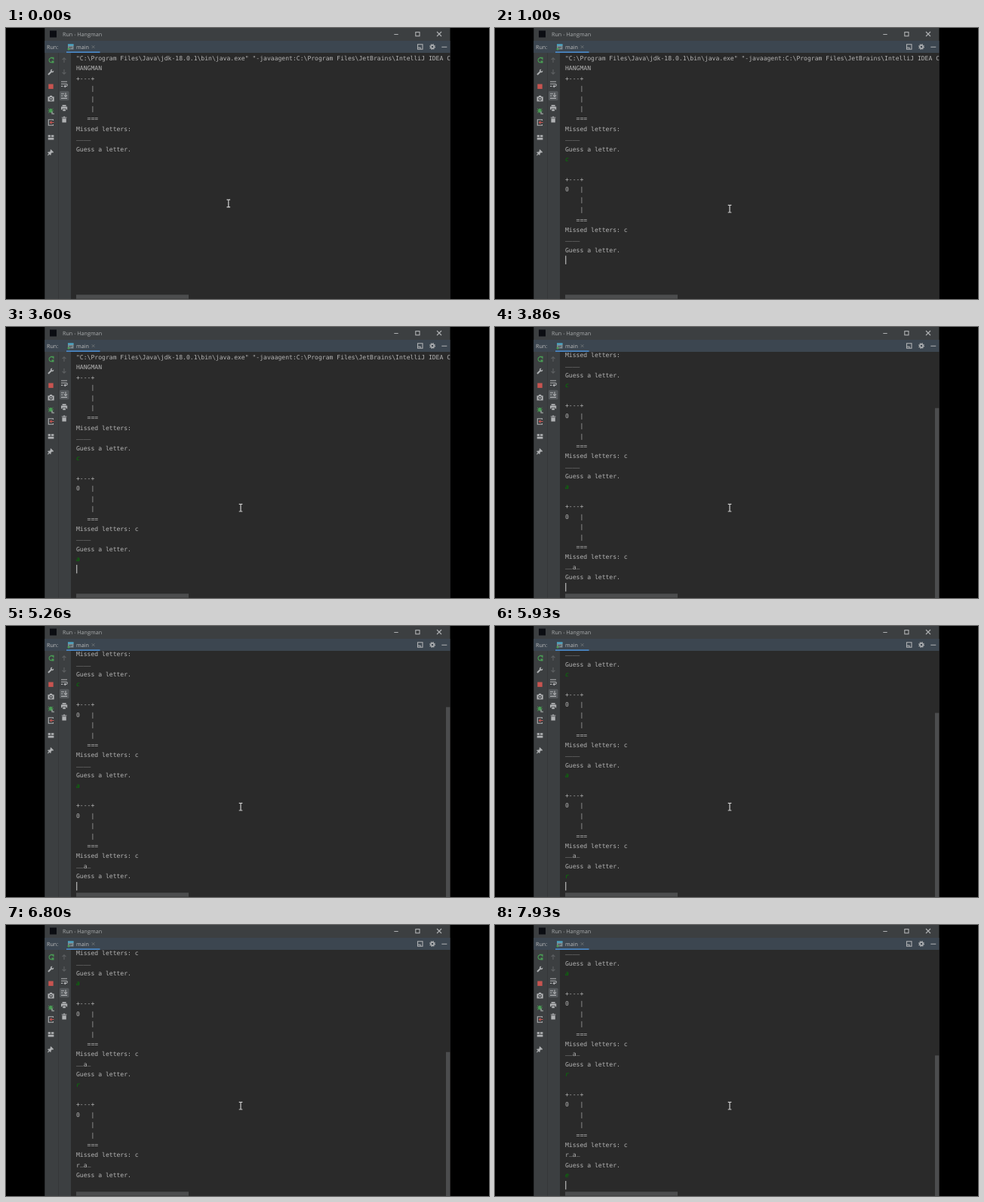
An HTML page for the animation above (8000 ms loop, 640 by 360 pixels).

```html
<!DOCTYPE html>
<html lang="en">
<head>
<meta charset="utf-8">
<title>Hangman console</title>
<style>
  html, body { margin: 0; width: 100%; height: 100%; overflow: hidden; background: #000; }
  svg { display: block; width: 100%; height: 100%; text-rendering: geometricPrecision; }
  .ui { font: 7.2px "Open Sans", sans-serif; fill: #bbb; }
  .console text { font: 8.08px "DejaVu Sans Mono", monospace; fill: #b5b5b5; white-space: pre; }
  .console .input { fill: #007f00; font-style: italic; }
  .blank { baseline-shift: 1.8px; }
  .icon { fill: none; stroke: #afb1b3; stroke-width: 1.1; }
  .dim { stroke: #5d6062; }
  .green { stroke: #499c54; }
  .solid { fill: #afb1b3; stroke: none; }
</style>
</head>
<body>
<svg viewBox="0 0 640 360">
  <defs>
    <clipPath id="pane"><rect x="86" y="33" width="502.5" height="327"/></clipPath>
  </defs>
  <rect width="640" height="360"/>
  <rect x="51.3" width="537.2" height="360" fill="#3c3f41"/>
  <rect x="86" y="33" width="502.5" height="327" fill="#2a2a2a"/>

  <!-- title bar -->
  <rect x="58" y="3.5" width="9" height="9" fill="#0b0d12"/>
  <text class="ui" x="75" y="10.7" style="fill:#a8abad">Run - Hangman</text>
  <g class="icon">
    <path d="M514.3 8.5h5.4M571 5l6 6m0-6l-6 6"/>
    <rect x="542.8" y="5.5" width="5.2" height="5.2"/>
  </g>

  <!-- tab bar -->
  <rect x="51.3" y="17" width="537.2" height="16" fill="#3c4650"/>
  <rect x="80" y="31.3" width="44.5" height="1.7" fill="#4a88c7"/>
  <text class="ui" x="54" y="27.8">Run:</text>
  <text class="ui" x="93" y="27.8">main</text>
  <rect x="82" y="21.5" width="7.5" height="7" fill="#7f8b91"/>
  <rect x="82" y="21.5" width="7.5" height="2" fill="#40a6c9"/>
  <path d="M83.5 25.5h4.5M83.5 27h3" stroke="#3c3f41" stroke-width=".7"/>
  <circle cx="83" cy="28" r="1.5" fill="#499c54"/>
  <path class="icon" style="stroke:#787b7d;stroke-width:.8" d="M113.8 23.3l3.6 3.6m0-3.6l-3.6 3.6"/>
  <g class="icon">
    <rect x="545.5" y="21.8" width="6.5" height="6.4"/>
    <path d="M546 26h3v2M577.3 25.2h7"/>
    <circle cx="565" cy="25" r="2.1" stroke-width="1.6"/>
    <circle cx="565" cy="25" r="3.4" stroke-dasharray="1.35 1.32"/>
  </g>

  <!-- run toolbar -->
  <path d="M69.5 33v327" stroke="#353739"/>
  <g class="icon">
    <path class="green" d="M62.5 41a3 3 0 1 0 0 3.5M59 39.3h4v3"/>
    <rect x="60.5" y="43.5" width="3" height="3" fill="#499c54" stroke="none"/>
    <path d="M56 62l4-4" stroke-width="2"/>
    <path class="solid" d="M61.5 54.8a2.2 2.2 0 1 0 1.7 1.7l-1.7 1.2l-1.1-1.1z"/>
    <rect x="56.3" y="74.5" width="6.4" height="6.4" fill="#c75450" stroke="none"/>
    <path class="solid" d="M55.5 91.2h2l1-1.4h2.2l1 1.4h2v6.3h-8.2z"/>
    <circle cx="59.6" cy="94.2" r="1.7" fill="#afb1b3" stroke="#3c3f41"/>
    <ellipse cx="59.3" cy="109.8" rx="2" ry="2.8" fill="#499c54" stroke="none"/>
    <path class="green" d="M56 107l6.5 6m0-6l-6.5 6M55.5 110h7.5" stroke-width=".8"/>
    <path d="M61 111v3h3"/>
    <path d="M62.5 123v-1.2h-6.2v7.4h6.2V128"/>
    <path d="M58.5 125.5h5M60.5 123.7l-2 1.8l2 1.8" stroke="#c75450"/>
    <path class="solid" d="M55.7 142.2h3.4v2.6h-3.4zM60 142.2h3.4v2.6H60zM55.7 145.7h7.7v2.8h-7.7z"/>
    <path class="solid" d="M59.5 161.3l3.7 3.7l-1 .7l-1.3-.3l-1.3 1.6l.1 1.4l-.8.7l-3.8-3.8l.8-.7l1.4.1l1.6-1.3l-.3-1.3z"/>
    <path d="M58 166.5l-2.6 2.6"/>
  </g>

  <!-- console toolbar -->
  <rect x="71" y="83.8" width="12.5" height="12.5" rx="1.5" fill="#55595c"/>
  <g class="icon">
    <path class="dim" d="M77 46v-6M74.6 42.2l2.4-2.4l2.4 2.4M77 55v6M74.6 58.8l2.4 2.4l2.4-2.4"/>
    <path d="M73 71.3h8M73 74.2h6.7a1.6 1.6 0 0 1 0 3.2h-2.2M78.8 75.8l-1.6 1.6l1.6 1.5M73 77.4h2.4"/>
    <path d="M73 87.3h4M73 90h2.5M79 86v5M77 89.3l2 2l2-2M73 93.4h8"/>
    <path class="solid" d="M74.6 102.2h5v1.8h-5zM73 104.6h8.2v4h-1.6v-1.6h-5v1.6H73zM75.3 107.7h3.6v2.6h-3.6z"/>
    <path class="solid" d="M73.8 118.4h2l.6-.8h1.4l.6.8h2v1.2h-6.6zM74.4 120.3h5.4v5.2h-5.4z"/>
  </g>

  <g class="console" clip-path="url(#pane)">
    <g id="page"><rect id="caret" width="1.1" height="11.4" fill="#c4c4c4"/></g>
  </g>
  <rect id="thumb" x="583" width="5.3" fill="#4c4d4e"/>
  <rect x="93" y="354.3" width="149" height="5.4" fill="#4c4d4e"/>

  <path id="pointer" fill="none" stroke="#d0d0d0" stroke-width="1.2"
        d="M-2.3-4.8h1.6l.7.5l.7-.5h1.6M-2.3 4.8h1.6l.7-.5l.7.5h1.6M0-4.5v9"/>
</svg>
<script>
const LOOP = 8000;
const LEFT = 93, TOP = 40, LINE = 13.41, CELL = 4.86;
const VIEW = 330, PANE_TOP = 33, LAST_ROW_Y = 305.7;

const board = (head, missed, word) => [
  '+---+', head + '   |', '    |', '    |', '   ===',
  'Missed letters: ' + missed, word, 'Guess a letter.'
];
const turn = (letter, word) => [{ input: letter }, '', ...board('0', 'c', word)];
const lines = [
  String.raw`"C:\Program Files\Java\jdk-18.0.1\bin\java.exe" "-javaagent:C:\Program Files\JetBrains\IntelliJ IDEA Community`,
  'HANGMAN',
  ...board(' ', '', '____'),
  ...turn('c', '____'),
  ...turn('a', '__a_'),
  ...turn('r', 'r_a_'),
  { input: 'e' }
];

// time, lines printed, caret row, caret column, caret visible
const steps = [
  [0, 10, 10, 0, 0],
  [400, 11, 10, 1, 1],
  [800, 11, 11, 0, 1],
  [930, 20, 20, 0, 1],
  [1730, 20, 20, 0, 0],
  [2260, 20, 20, 0, 1],
  [2730, 20, 20, 0, 0],
  [3130, 21, 20, 1, 1],
  [3600, 21, 21, 0, 1],
  [3800, 30, 30, 0, 1],
  [4730, 30, 30, 0, 0],
  [5260, 30, 30, 0, 1],
  [5460, 31, 30, 1, 1],
  [5930, 31, 31, 0, 1],
  [6130, 40, 40, 0, 1],
  [6800, 40, 40, 0, 0],
  [7330, 40, 40, 0, 1],
  [7530, 41, 40, 1, 1],
  [7800, 41, 41, 0, 1]
];

const byId = id => document.getElementById(id);
const page = byId('page'), caret = byId('caret'), thumb = byId('thumb'), pointer = byId('pointer');
const svgNode = name => document.createElementNS('http://www.w3.org/2000/svg', name);

// Underscores sit close to the baseline, so they get their own spans.
const rows = lines.map((line, i) => {
  const text = svgNode('text');
  for (const part of (line.input ?? line).split(/(_+)/)) {
    const span = text.appendChild(svgNode('tspan'));
    span.textContent = part;
    if (part.startsWith('_')) span.setAttribute('class', 'blank');
  }
  if (line.input) text.setAttribute('class', 'input');
  text.setAttribute('x', LEFT);
  text.setAttribute('y', TOP + i * LINE + 3);
  return page.appendChild(text);
});

function drawConsole(time) {
  const [, printed, row, col, visible] = steps.findLast(step => step[0] <= time);
  rows.forEach((text, i) => text.style.display = i < printed ? '' : 'none');
  caret.setAttribute('x', LEFT + col * CELL + 0.2);
  caret.setAttribute('y', TOP + row * LINE - 5.7);
  caret.style.display = visible ? '' : 'none';

  const scroll = Math.max(0, row * LINE - LAST_ROW_Y);
  const thumbTop = PANE_TOP + scroll * VIEW / (scroll + VIEW);
  page.setAttribute('transform', `translate(0 ${-scroll})`);
  thumb.setAttribute('y', thumbTop);
  thumb.setAttribute('height', 360 - thumbTop);
  thumb.style.display = scroll ? '' : 'none';
}

function drawPointer(time) {
  const p = Math.min(1, Math.max(0, (time - 60) / 400));
  const eased = p * p * (3 - 2 * p);
  pointer.setAttribute('transform', `translate(${294.8 + 16.2 * eased} ${233 + 7.2 * eased})`);
}

const start = performance.now();
function frame() {
  const time = (performance.now() - start) % LOOP;
  drawConsole(time);
  drawPointer(time);
  requestAnimationFrame(frame);
}
frame();
</script>
</body>
</html>
```
